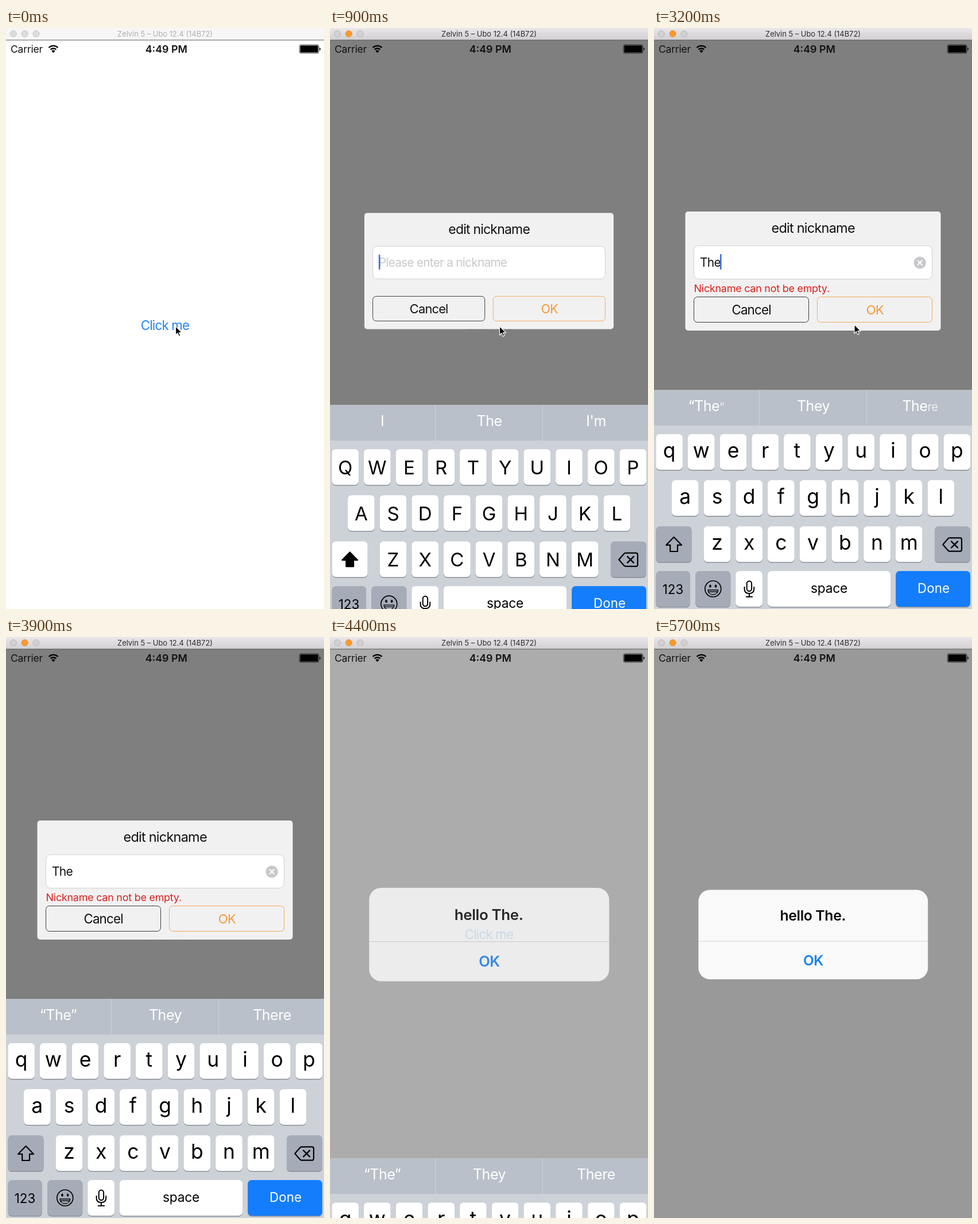
An HTML page for the animation above (5800 ms loop, 554 by 1010 pixels).

```html
<!DOCTYPE html>
<html lang="en">
<head>
<meta charset="utf-8">
<title>Edit nickname</title>
<style>
html, body { margin: 0; width: 100%; height: 100%; overflow: hidden; background: #fff; }
svg { display: block; width: 100vw; height: 100vh; }
text { font-family: Inter, Roboto, sans-serif; font-optical-sizing: none; white-space: pre; }
</style>
</head>
<body>
<svg id="stage" viewBox="0 0 554 1010" xmlns="http://www.w3.org/2000/svg">
  <defs>
    <linearGradient id="bar" x1="0" y1="0" x2="0" y2="1">
      <stop offset="0" stop-color="#e9e7ea"/><stop offset="1" stop-color="#d1cfd2"/>
    </linearGradient>
  </defs>
  <rect width="554" height="1010" fill="#fff"/>
  <g id="click"></g>
  <g id="modal">
    <rect y="21" width="554" height="989" fill="#000" opacity=".5"/>
    <g id="popup"></g>
  </g>
  <rect id="dim" y="21" width="554" height="989" fill="#000"/>
  <g id="alert"></g>
  <g id="keyboard"></g>
  <g id="status"></g>
  <g id="titlebar"></g>
  <path id="mouse" d="M0 0V15.2L3.5 11.9 5.9 17.3 8.4 16.2 6 11H10.9Z" fill="#000" stroke="#fff" stroke-width="1.2"/>
</svg>
<script>
const LOOP = 5800;
const $ = id => document.getElementById(id);
const NS = "http://www.w3.org/2000/svg";

function add(parent, tag, attrs, content) {
  const el = document.createElementNS(NS, tag);
  for (const k in attrs) el.setAttribute(k, attrs[k]);
  if (content !== undefined) el.textContent = content;
  return parent.appendChild(el);
}
const label = (parent, s, x, y, size, fill, spacing = 0, more = {}) =>
  add(parent, "text", { x, y, "font-size": size, fill, "letter-spacing": spacing + "em",
    "text-anchor": "middle", ...more }, s);
const box = (parent, x, y, width, height, rx, fill, more = {}) =>
  add(parent, "rect", { x, y, width, height, rx, fill, ...more });
const line = (parent, d, width, more = {}) =>
  add(parent, "path", { d, fill: "none", stroke: "#000", "stroke-width": width,
    "stroke-linecap": "round", "stroke-linejoin": "round", ...more });

const START = { "text-anchor": "start" };
const BOLD = { "font-weight": 600 };

// Window title
const titlebar = $("titlebar");
const bar = box(titlebar, 0, 0, 554, 21, 0, "#f6f6f6");
box(titlebar, 0, 20.5, 554, 1, 0, "#5a5a5a");
const lights = [12.8, 32.7, 52.5].map(cx =>
  add(titlebar, "circle", { cx, cy: 10, r: 5.5, "stroke-width": 1 }));
const title = label(titlebar, "Zelvin 5 – Ubo 12.4 (14B72)", 277, 15, 12.9, "#b0b0b0");

// Status bar
const status = $("status");
label(status, "Carrier", 8, 43, 17.5, "#111", -.01, START);
label(status, "4:49 PM", 279.3, 43, 17.8, "#111", 0, BOLD);
line(status, "M74.6 34.2A11 11 0 0 1 90.4 34.2M77.6 37.5A7 7 0 0 1 87.4 37.5", 2.4, { "stroke-linecap": "butt" });
add(status, "path", { d: "M82.5 43.2L79.3 39.9A4.6 4.6 0 0 1 85.7 39.9Z" });
box(status, 511.5, 29.3, 33.2, 14.4, 3, "none", { stroke: "#000", "stroke-opacity": .5, "stroke-width": 1.7 });
box(status, 512.6, 30.5, 31, 12, 1.5, "#000");
add(status, "path", { d: "M546 34Q548.2 34.5 548.2 36.5T546 39Z", fill: "#222" });

label($("click"), "Click me", 277, 525, 22.3, "#2385f0", -.035);

// Nickname dialog
const popup = $("popup");
box(popup, 54.5, 319, 445, 207, 5, "#f1f1f1");
label(popup, "edit nickname", 277.2, 356, 23.5, "#111", -.033);
box(popup, 69.5, 378.5, 415, 58, 8, "#fff", { stroke: "#cfcfd2" });
const hint = label(popup, "Please enter a nickname", 80, 415, 21.3, "#c9c9ce", -.035, START);
const typed = label(popup, "", 80, 415, 21, "#111", -.035, START);
const caret = box(popup, 80, 393, 2.6, 27, 1, "#4070d2");
const clear = add(popup, "g", {});
add(clear, "circle", { cx: 463.2, cy: 408, r: 10.6, fill: "#c8c8cc" });
line(clear, "M459.4 404.2L467 411.8M467 404.2L459.4 411.8", 2, { stroke: "#fff" });
const error = label(popup, "Nickname can not be empty.", 69.5, 459, 17.9, "#d8201d", -.012, START);
box(popup, 69.5, 467.5, 200, 44, 6, "none", { stroke: "#3c3c3c" });
box(popup, 284.5, 467.5, 200, 44, 6, "none", { stroke: "#f4aa5c" });
label(popup, "Cancel", 169.6, 498, 22.3, "#111", -.035);
label(popup, "OK", 385, 498, 22, "#f39a38", -.03);

// Greeting alert
const alertBox = $("alert");
box(alertBox, 77.4, 439.5, 399.8, 155.5, 20, "#fff", { opacity: .94 });
box(alertBox, 77.4, 528.5, 399.8, 1, 0, "#d3d3d8");
label(alertBox, "hello The.", 276.7, 493, 24.8, "#0b0b0b", -.015, BOLD);
label(alertBox, "OK", 277.5, 571, 24.3, "#1a82f0", -.02, BOLD);

// Keyboard
const keyboard = $("keyboard");
box(keyboard, 0, 629, 554, 381, 0, "#cdd1d8");
box(keyboard, 0, 629, 554, 62, 0, "#b9c0c9");
for (const x of [183, 370]) box(keyboard, x, 629, 1, 62, 0, "#cdd3da");
const slots = [91, 277.5, 463.5].map(x => {
  const el = label(keyboard, "", x, 666, 25, "#fff", -.02);
  return { head: add(el, "tspan", {}), tail: add(el, "tspan", {}) };
});

function key(x, y, w, fill = "#fff") {
  box(keyboard, x, y + 1.5, w, 62, 6.5, "#8b8f97");
  return box(keyboard, x, y, w, 62, 6.5, fill);
}
const DARK = "#a5acb8";
const STEP = 55.7;
const letters = [];
[["QWERTYUIOP", 3.3, 706], ["ASDFGHJKL", 31, 786], ["ZXCVBNM", 86.7, 866.3]].forEach(([row, x0, y]) => {
  [...row].forEach((ch, i) => {
    const x = x0 + i * STEP;
    key(x, y, 46.6);
    letters.push({ ch, y, el: label(keyboard, ch, x + 23.3, y, 33, "#000") });
  });
});
const shiftKey = key(3.5, 866.3, 62);
const shift = line(keyboard, "M34.6 885L48 898.8H41V910H28.2V898.8H21.2Z", 2.2);
key(489, 866.3, 62, DARK);
line(keyboard, "M503.3 898L512 888Q513.2 886.4 515 886.4H533Q536 886.4 536 889.5V906.5Q536 909.6 533 909.6H515Q513.2 909.6 512 908Z", 2.2);
line(keyboard, "M518.2 892.6L529 903.4M529 892.6L518.2 903.4", 2.4);

key(3.5, 944, 59.5, DARK);
label(keyboard, "123", 33, 984, 22.3, "#000");
key(72.3, 944, 61, DARK);
add(keyboard, "circle", { cx: 102.8, cy: 975, r: 14, fill: "none", stroke: "#000", "stroke-width": 1.7 });
for (const cx of [98, 107.6]) add(keyboard, "ellipse", { cx, cy: 970.2, rx: 1.8, ry: 2.7 });
line(keyboard, "M93.8 977H111.8Q110.6 985 102.8 985T93.8 977ZM95 980H110.6", 1.3);
key(142.3, 944, 46.6);
box(keyboard, 161.7, 961.5, 8.4, 17.5, 4.2, "none", { stroke: "#000", "stroke-width": 2 });
line(keyboard, "M157.6 972V975.5Q157.6 983 165.9 983T174.2 975.5V972M165.9 983V988.6M160.7 988.8H171.1", 2);
key(198, 944, 214);
label(keyboard, "space", 305, 982, 22.7, "#000", -.01);
key(421.2, 944, 129.8, "#147dfb");
label(keyboard, "Done", 487, 982, 22.4, "#fff");

// Timing
const clamp = v => Math.min(1, Math.max(0, v));
const ramp = (t, a, b) => clamp((t - a) / (b - a));
const smooth = p => p * p * (3 - 2 * p);
const settle = (t, start, tau) => t < start ? 0 : 1 - Math.exp(-(t - start) / tau);
const show = (el, v) => el.setAttribute("opacity", +v);
const about = (x, y, s) => `translate(${x} ${y}) scale(${s}) translate(${-x} ${-y})`;

// Each step: time, typed text, suggestions as [settled part, growing part]
const typing = [
  [0, "", [["I", ""], ["The", ""], ["I'm", ""]]],
  [2700, "T", [["“T", "”"], ["The", ""], ["T", "o"]]],
  [2900, "Th", [["“Th", "”"], ["The", ""], ["Th", "is"]]],
  [3100, "The", [["“The", "”"], ["They", ""], ["The", "re"]]]
];
// Mouse stops: time, x, y
const stops = [[0, 295.5, 518.6], [1050, 295.5, 518.6], [1450, 357, 484.6],
  [1850, 357, 484.6], [2200, 349, 515.6]];

function mouseAt(t) {
  let i = 0;
  while (i < stops.length - 2 && t >= stops[i + 1][0]) i++;
  const [t0, x0, y0] = stops[i], [t1, x1, y1] = stops[i + 1];
  const p = smooth(ramp(t, t0, t1));
  return `translate(${x0 + (x1 - x0) * p} ${y0 + (y1 - y0) * p})`;
}

// Caret stays lit after input, then fades out and back
function caretAt(t) {
  if (t < 580 || t >= 3900) return 0;
  const input = [3100, 2900, 2700, 1700, 580].find(at => t >= at);
  const p = (t - input) % 1050;
  return 1 - ramp(p, 500, 640) + ramp(p, 920, 1050);
}

function drawTitle(active) {
  bar.setAttribute("fill", active ? "url(#bar)" : "#f6f6f6");
  title.setAttribute("fill", active ? "#2b2b2b" : "#b0b0b0");
  lights.forEach((el, i) => {
    const lit = active && i === 1;
    el.setAttribute("fill", lit ? "#f79a30" : active ? "#d2d0d2" : "#dcdcdc");
    el.setAttribute("stroke", lit ? "#e8932f" : active ? "#b8b6b8" : "#c6c6c6");
  });
}

function draw(t) {
  drawTitle(t >= 500);

  show($("click"), t < 500 ? 1 : t < 4450 ? .2 + .8 * ramp(t, 900, 1100) : 1 - ramp(t, 4500, 4700));
  show($("modal"), t < 580 ? 0 : 1 - ramp(t, 3900, 4190));
  popup.setAttribute("transform", about(277, 422.5, .508 + .492 * settle(t, 600, 100)));

  let step = typing[0];
  for (const s of typing) if (t >= s[0]) step = s;
  const [at, word, words] = step;
  typed.textContent = word;
  show(hint, !word);
  show(clear, !!word);
  show(error, t >= 1700);
  caret.setAttribute("x", word ? 79 + typed.getComputedTextLength() : 80);
  show(caret, caretAt(t));

  const grow = ramp(t, at, at + 160);
  slots.forEach(({ head, tail }, i) => {
    head.textContent = words[i][0];
    tail.textContent = words[i][1];
    tail.setAttribute("font-size", 25 * (.5 + .5 * grow));
    tail.setAttribute("fill-opacity", .3 + .7 * grow);
  });

  const lower = !!word;
  for (const { ch, y, el } of letters) {
    el.textContent = lower ? ch.toLowerCase() : ch;
    el.setAttribute("font-size", lower ? 35.5 : 33);
    el.setAttribute("y", y + (lower ? 41 : 44));
  }
  shiftKey.setAttribute("fill", lower ? DARK : "#fff");
  shift.setAttribute("fill", lower ? "none" : "#000");

  const hidden = t < 4250 ? 1 - settle(t, 600, 113) : settle(t, 4250, 113);
  keyboard.setAttribute("transform", `translate(0 ${t < 580 || t >= 4900 ? 390 : 376 * hidden + 6 * ramp(t, 4500, 4800)})`);

  const greet = settle(t, 4250, 89);
  show($("dim"), .4 * greet);
  show(alertBox, greet);
  alertBox.setAttribute("transform", about(277.3, 517.2, 1 + .25 * (1 - greet)));

  const mouse = $("mouse");
  mouse.setAttribute("transform", mouseAt(t));
  show(mouse, t < 3900);
}

function tick() {
  draw(performance.now() % LOOP);
  requestAnimationFrame(tick);
}
tick();
</script>
</body>
</html>
```
